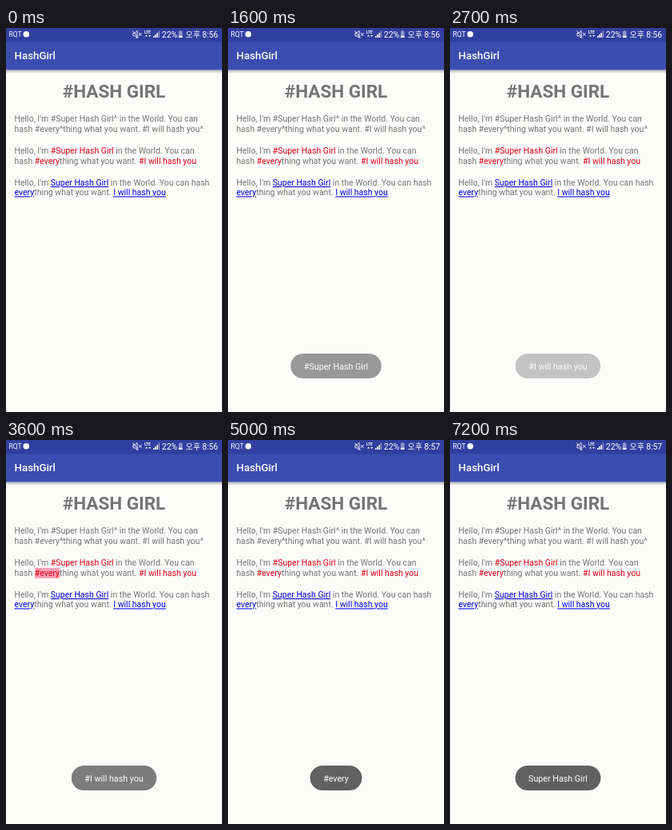
Animation of 270x480 px, one loop 8000 ms. Source, as an HTML page:

```html
<!DOCTYPE html>
<html lang="en">
<head>
<meta charset="utf-8">
<title>HashGirl</title>
<style>
  html, body { margin: 0; width: 100%; height: 100%; overflow: hidden; background: #fcfcfb; }
  svg { display: block; width: 270px; height: 480px; font-family: Roboto, "Noto Sans", sans-serif; }
  .bar { fill: #fff; }
  .body { font-size: 10.5px; fill: #747474; }
  .tag { fill: #e00012; }
  .link { fill: #0000e6; text-decoration: underline; }
  .korean { font-family: "Noto Sans CJK KR", "Noto Sans CJK", "Noto Sans CJK JP", sans-serif; }
</style>
</head>
<body>
<svg viewBox="0 0 270 480">
  <defs>
    <linearGradient id="shade" x2="0" y2="1">
      <stop offset="0" stop-color="#000" stop-opacity=".28"/>
      <stop offset="1" stop-color="#000" stop-opacity="0"/>
    </linearGradient>
  </defs>
  <rect width="270" height="480" fill="#fcfcfb"/>
  <rect y="52.5" width="270" height="4.5" fill="url(#shade)"/>
  <rect width="270" height="52.5" fill="#3b4daf"/>
  <rect width="270" height="17.5" fill="#303f9f"/>

  <g class="bar">
    <text x="3.5" y="11" font-size="8.6">RQT</text>
    <circle cx="25.3" cy="7.8" r="3.8"/>
    <g fill="none" stroke="#fff" stroke-width=".9">
      <path d="M159 6.2h2l3-2.7v9l-3-2.7h-2z"/>
      <path d="M158.5 3.5l7 9M166 6l3.4 3.8M169.4 6L166 9.8"/>
    </g>
    <text x="173" y="7.3" font-size="4.8" font-weight="700">LTE</text>
    <path d="M174 10.5l1.6-2 1.6 2zM178 9l1.6 2 1.6-2z"/>
    <path d="M184 12v-2h1.5v2zM186.2 12V8h1.5v4zM188.4 12V6h1.5v6z"/>
    <path d="M190.6 12V3.5h1.5V12z" opacity=".45"/>
    <text x="194.8" y="11.6" font-size="10.5">22%</text>
    <path d="M217.2 3h2v1h1.3v8h-4.6V4h1.3z" opacity=".45"/>
    <path d="M215.9 9.8h4.6V12h-4.6z"/>
    <text class="korean" x="224.5" y="11.6" font-size="10">오후</text>
    <text id="clock" x="265" y="11.6" font-size="10.3" text-anchor="end"></text>
    <text x="10.5" y="39.3" font-size="13.3" font-weight="500">HashGirl</text>
  </g>

  <text x="135" y="87" font-size="22.5" font-weight="700" fill="#747474" text-anchor="middle">#HASH GIRL</text>

  <rect id="highlight" height="13" fill="#ff9fb6"/>

  <g class="body">
    <text x="10.5" y="117.4">Hello, I'm #Super Hash Girl^ in the World. You can</text>
    <text x="10.5" y="129.8">hash #every^thing what you want. #I will hash you^</text>
    <text x="10.5" y="157.2">Hello, I'm <tspan class="tag">#Super Hash Girl</tspan> in the World. You can</text>
    <text x="10.5" y="169.7">hash <tspan class="tag">#every</tspan>thing what you want. <tspan class="tag">#I will hash you</tspan></text>
    <text x="10.5" y="197">Hello, I'm <tspan class="link">Super Hash Girl</tspan> in the World. You can hash</text>
    <text x="10.5" y="209.4"><tspan class="link">every</tspan>thing what you want. <tspan class="link">I will hash you</tspan></text>
  </g>

  <g id="toast">
    <rect id="pill" y="407" height="31" rx="15.5" fill="#616161"/>
    <text id="message" x="135" y="427" font-size="10.7" fill="#fff" text-anchor="middle"></text>
  </g>
</svg>
<script>
  const LOOP = 8000, STEP = 100, FADE = 500;
  const el = id => document.getElementById(id);
  const [clock, highlight, toast, pill, message] =
    ['clock', 'highlight', 'toast', 'pill', 'message'].map(el);

  const taps = [
    { from: 1100, to: 1300, x: 56, y: 147, w: 79 },
    { from: 2100, to: 2400, x: 166, y: 159.8, w: 73 },
    { from: 3500, to: 3700, x: 36, y: 159.8, w: 31.3 },
    { from: 6500, to: 6700, x: 56, y: 187, w: 72.3 }
  ];
  const toasts = [
    { text: '#Super Hash Girl', show: 1400, hide: 2090 },
    { text: '#I will hash you', show: 2600, hide: 3390 },
    { text: '#every', show: 4000, hide: 5915 },
    { text: 'Super Hash Girl', show: 6700, hide: Infinity }
  ];

  const set = (node, attrs) => {
    for (const name in attrs) node.setAttribute(name, attrs[name]);
  };
  const progress = (t, start) => Math.min(1, Math.max(0, (t - start) / FADE));

  function drawHighlight(t) {
    const tap = taps.find(({ from, to }) => t >= from && t < to);
    set(highlight, { opacity: tap ? 1 : 0 });
    if (tap) set(highlight, { x: tap.x, y: tap.y, width: tap.w });
  }

  function drawToast(t) {
    const current = toasts.find(({ show, hide }) => t >= show && t < hide + FADE);
    if (!current) return set(toast, { opacity: 0 });
    // Decelerate in, accelerate out.
    const shown = 1 - (1 - progress(t, current.show)) ** 2;
    const hidden = progress(t, current.hide) ** 2;
    message.textContent = current.text;
    const width = message.getComputedTextLength() + 33;
    set(pill, { x: 135 - width / 2, width });
    set(toast, { opacity: shown * (1 - hidden) });
  }

  function draw(t) {
    clock.textContent = t < 5000 ? '8:56' : '8:57';
    drawHighlight(t);
    drawToast(t);
  }

  const start = performance.now();
  function tick() {
    const elapsed = (performance.now() - start) % LOOP;
    draw(Math.floor(elapsed / STEP) * STEP);
    requestAnimationFrame(tick);
  }
  tick();
</script>
</body>
</html>
```
